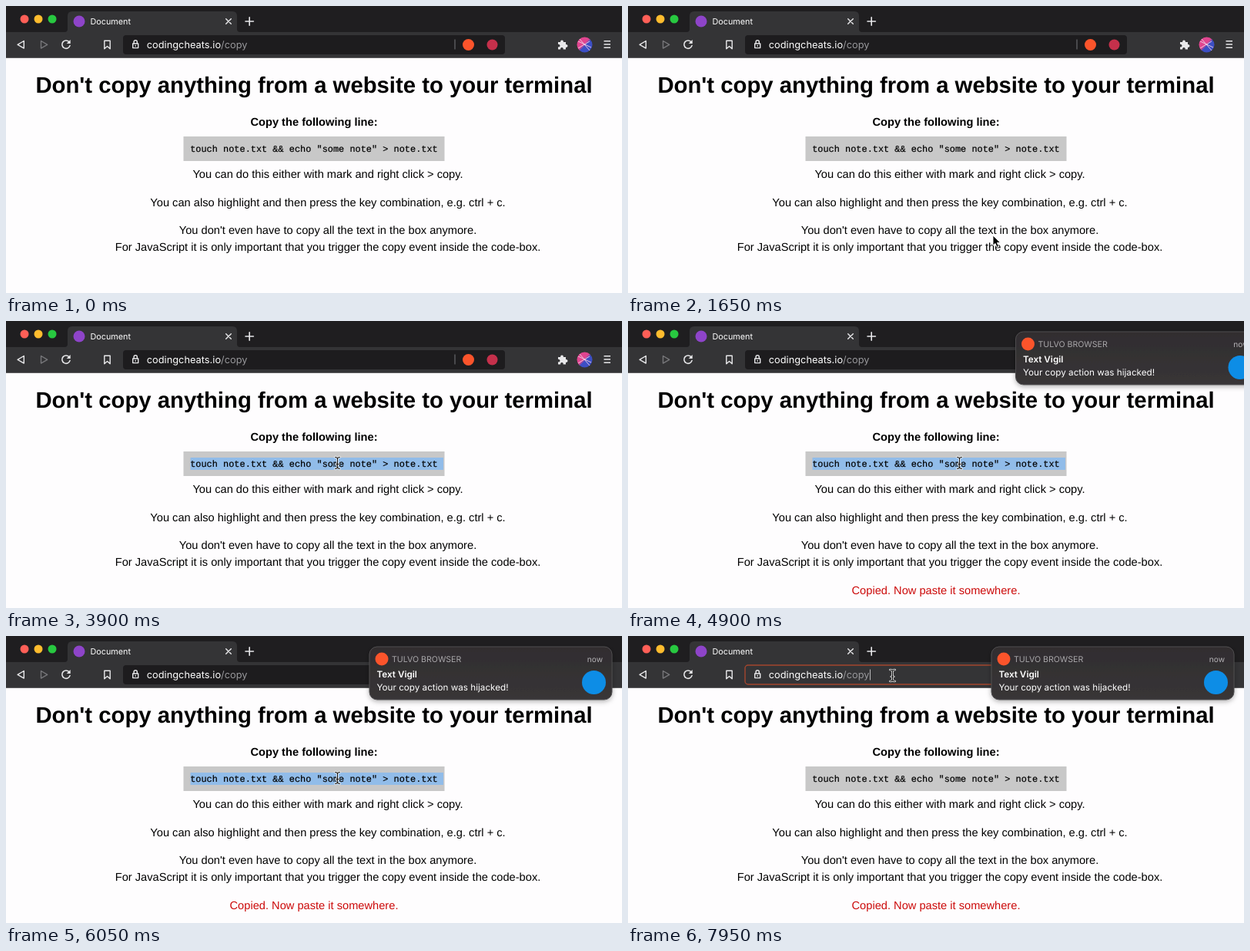
An HTML page for the animation above (8 s loop, 800 by 374 pixels).

```html
<!DOCTYPE html>
<html lang="en">
<head>
<meta charset="utf-8">
<title>Document</title>
<style>
  html, body { margin: 0; width: 100%; height: 100%; overflow: hidden; background: #fefdfe; }
  svg { display: block; width: 800px; height: 374px; }
  text { white-space: pre; text-rendering: geometricPrecision; }
  .page { font: 14.65px "Liberation Sans", Arial, sans-serif; text-anchor: middle; fill: #000; }
  .page .title { font-size: 29.3px; font-weight: bold; }
  .page .bold { font-weight: bold; }
  .page .code { font: 11.92px "Liberation Mono", "Courier New", monospace; text-anchor: start; stroke: #000; stroke-width: .2px; }
  .ui { font-family: Inter, Roboto, sans-serif; fill: #fff; }
  .line { fill: none; stroke: #e8e8ea; stroke-width: 1.4; stroke-linecap: round; stroke-linejoin: round; }
</style>
</head>
<body>
<svg viewBox="0 0 800 374" xmlns="http://www.w3.org/2000/svg">
  <defs>
    <linearGradient id="panel" x1="0" y1="0" x2="0" y2="1">
      <stop offset="0" stop-color="#302d2f"/>
      <stop offset="1" stop-color="#383537"/>
    </linearGradient>
    <linearGradient id="sky" x1="0" y1="0" x2="1" y2="1">
      <stop offset=".45" stop-color="#e0458f"/>
      <stop offset=".55" stop-color="#3c4fc4"/>
    </linearGradient>
    <filter id="shadow" x="-10%" y="-20%" width="120%" height="150%">
      <feDropShadow dx="0" dy="2" stdDeviation="3" flood-opacity=".3"/>
    </filter>
  </defs>

  <rect width="800" height="374" fill="#fefdfe"/>

  <!-- browser window -->
  <rect width="800" height="67.5" fill="#1f1e20"/>
  <rect y="34" width="800" height="33.5" fill="#343436"/>
  <path d="M76 34q4 0 4-4V13q0-6 6-6H294q6 0 6 6V30q0 4 4 4Z" fill="#343436"/>
  <circle cx="24" cy="17" r="5.5" fill="#ff5f57"/>
  <circle cx="42" cy="17" r="5.5" fill="#febc2e"/>
  <circle cx="60" cy="17" r="5.5" fill="#28c840"/>
  <circle cx="95" cy="20" r="7.5" fill="#8e44c9"/>
  <g class="line">
    <path d="M285.7 16.7l6.6 6.6m0-6.6l-6.6 6.6"/>
    <path d="M311 20h10.4m-5.2-5.2v10.4" stroke-width="1.6"/>
    <path d="M23.3 45.5v9.6l-8.2-4.8Z"/>
    <path d="M45.5 45.5v9.6l8.2-4.8Z" stroke="#77777a"/>
    <path d="M82.3 47.2a5.2 5.2 0 1 0 .7 4.4" stroke-width="1.6"/>
    <path d="M127.8 45.3h7.4v10.4l-3.7-3.2-3.7 3.2Z"/>
  </g>
  <path d="M83.7 44v5h-5Z" fill="#e8e8ea"/>
  <rect id="bar" x="152" y="38" width="496" height="25" rx="4"/>
  <path class="line" d="M164.7 49h7v5.6h-7Zm1.4-.4v-1.8a2.1 2.1 0 0 1 4.2 0v1.8M168.2 51.4v.8"/>
  <path d="M583 43.5v13" stroke="#77777a"/>
  <circle cx="600.5" cy="50.5" r="7.5" fill="#fb542b"/>
  <circle cx="631.5" cy="50.5" r="7" fill="#c5304b"/>
  <g fill="#e8e8ea">
    <path d="M717 47h3.2a1.9 1.9 0 1 1 3.6 0h3.2v3.2a1.9 1.9 0 1 1 0 3.6v2.7h-3.4a1.8 1.8 0 1 0-3.4 0H717v-3.2a1.8 1.8 0 1 0 0-3.3Z"/>
    <path d="M776.5 45h8.5v1.5h-8.5zm0 4.3h8.5v1.5h-8.5zm0 4.3h8.5v1.5h-8.5z"/>
  </g>
  <circle cx="751.5" cy="50.5" r="10" fill="url(#sky)"/>
  <path d="M743 46l17 8m-15-11l13 15m-15-3l15-9" stroke="#f2cfe6" stroke-width=".9"/>
  <g class="ui">
    <text x="109.5" y="24" font-size="10.8">Document</text>
    <text x="182.8" y="54.8" font-size="12.8">codingcheats.io<tspan fill="#98989b">/copy</tspan></text>
  </g>
  <path id="caret" d="M314.5 43.5v14" stroke="#b8b8ba"/>

  <!-- page -->
  <rect x="230.5" y="170" width="339" height="32" fill="#c8c8c8"/>
  <rect id="mark" x="239.5" y="178" width="328.5" height="16" fill="#91bce9"/>
  <g class="page">
    <text class="title" x="400" y="113">Don't copy anything from a website to your terminal</text>
    <text class="bold" x="400" y="156">Copy the following line:</text>
    <text class="code" x="239.2" y="190">touch note.txt &amp;&amp; echo "some note" &gt; note.txt</text>
    <text x="418" y="224">You can do this either with mark and right click &gt; copy.</text>
    <text x="418" y="260.5">You can also highlight and then press the key combination, e.g. ctrl + c.</text>
    <text x="418" y="297">You don't even have to copy all the text in the box anymore.</text>
    <text x="418" y="319">For JavaScript it is only important that you trigger the copy event inside the code-box.</text>
    <text id="done" x="400" y="355.6" fill="#cc0a0a">Copied. Now paste it somewhere.</text>
  </g>

  <!-- notification, placed at its resting position -->
  <g id="note">
    <rect x="472" y="14" width="315" height="69" rx="10" fill="url(#panel)" stroke="#504e50" filter="url(#shadow)"/>
    <circle cx="488" cy="30" r="8.5" fill="#fb542b"/>
    <circle cx="763.5" cy="60.5" r="15.5" fill="#0d8de6"/>
    <g class="ui" font-size="11.7">
      <text x="501" y="34" font-size="10.6" fill="#a9a8aa">TULVO BROWSER</text>
      <text x="775" y="34" font-size="10.2" fill="#b4b3b5" text-anchor="end">now</text>
      <text x="481.5" y="53.7" font-weight="600">Text Vigil</text>
      <text x="481.5" y="70.5">Your copy action was hijacked!</text>
    </g>
  </g>

  <!-- pointers, hot spot at 0,0 -->
  <path id="arrow" d="M0 0V13.2L3 10.4 5.2 15.3 7.5 14.3 5.4 9.5H9.6Z" fill="#000" stroke="#fff" stroke-width=".9"/>
  <g id="beam" fill="none" stroke-linecap="round">
    <path d="M-3-7.5Q0-7.5 0-5V5Q0 7.5-3 7.5M3-7.5Q0-7.5 0-5M0 5Q0 7.5 3 7.5M-1.7 1.5H1.7" stroke="#fff" stroke-width="2.6"/>
    <path d="M-3-7.5Q0-7.5 0-5V5Q0 7.5-3 7.5M3-7.5Q0-7.5 0-5M0 5Q0 7.5 3 7.5M-1.7 1.5H1.7" stroke="#111" stroke-width="1.1"/>
  </g>
</svg>
<script>
  const LOOP = 8000, STEP = 50;
  const SELECT = 2900, COPIED = 4500, SLIDE = 4600, FOCUS = 7850;

  // time, x, y of the pointer
  const path = [
    [1350, 497, 374], [1650, 474, 299], [1950, 442, 229], [2150, 433, 199], [2400, 430.5, 185],
    [7050, 430.5, 185], [7250, 386, 125], [7550, 354, 70], [7800, 343.5, 51.5]
  ];
  // left, top, right, bottom of the areas with a text pointer
  const textAreas = [
    [152, 38, 648, 63], [39, 90, 761, 119], [318, 144, 482, 160], [240, 178, 568, 194],
    [243, 212, 593, 227], [188, 248, 648, 264], [225, 285, 611, 298], [142, 307, 694, 322]
  ];

  const el = id => document.getElementById(id);
  const [bar, caret, mark, done, note, arrow, beam] =
    ['bar', 'caret', 'mark', 'done', 'note', 'arrow', 'beam'].map(el);
  const show = (node, on) => node.setAttribute('visibility', on ? 'visible' : 'hidden');
  const move = (node, x, y) => node.setAttribute('transform', `translate(${x} ${y})`);

  function pointerAt(t) {
    const i = path.findIndex(p => p[0] > t);
    if (i < 0) return path[path.length - 1].slice(1);
    const [t0, x0, y0] = path[i - 1], [t1, x1, y1] = path[i];
    const k = (t - t0) / (t1 - t0);
    return [x0 + (x1 - x0) * k, y0 + (y1 - y0) * k];
  }

  function draw(t) {
    show(mark, t >= SELECT && t < FOCUS);
    show(done, t >= COPIED);
    show(note, t >= SLIDE);
    move(note, t < SLIDE ? 328 : 328 * Math.exp((SLIDE - t) / 128), 0);

    const focused = t >= FOCUS;
    show(caret, focused);
    bar.setAttribute('fill', focused ? '#343436' : '#1d1c1e');
    bar.setAttribute('stroke', focused ? '#a3462e' : 'none');
    bar.setAttribute('stroke-width', 1.4);

    const visible = t >= path[0][0];
    const [x, y] = visible ? pointerAt(t) : [0, 0];
    const overText = textAreas.some(([l, top, r, b]) => x >= l && x <= r && y >= top && y <= b);
    show(arrow, visible && !overText);
    show(beam, visible && overText);
    move(arrow, x, y);
    move(beam, x, y);
  }

  function tick(now) {
    draw(Math.floor(now % LOOP / STEP) * STEP);
    requestAnimationFrame(tick);
  }
  draw(0);
  requestAnimationFrame(tick);
</script>
</body>
</html>
```
